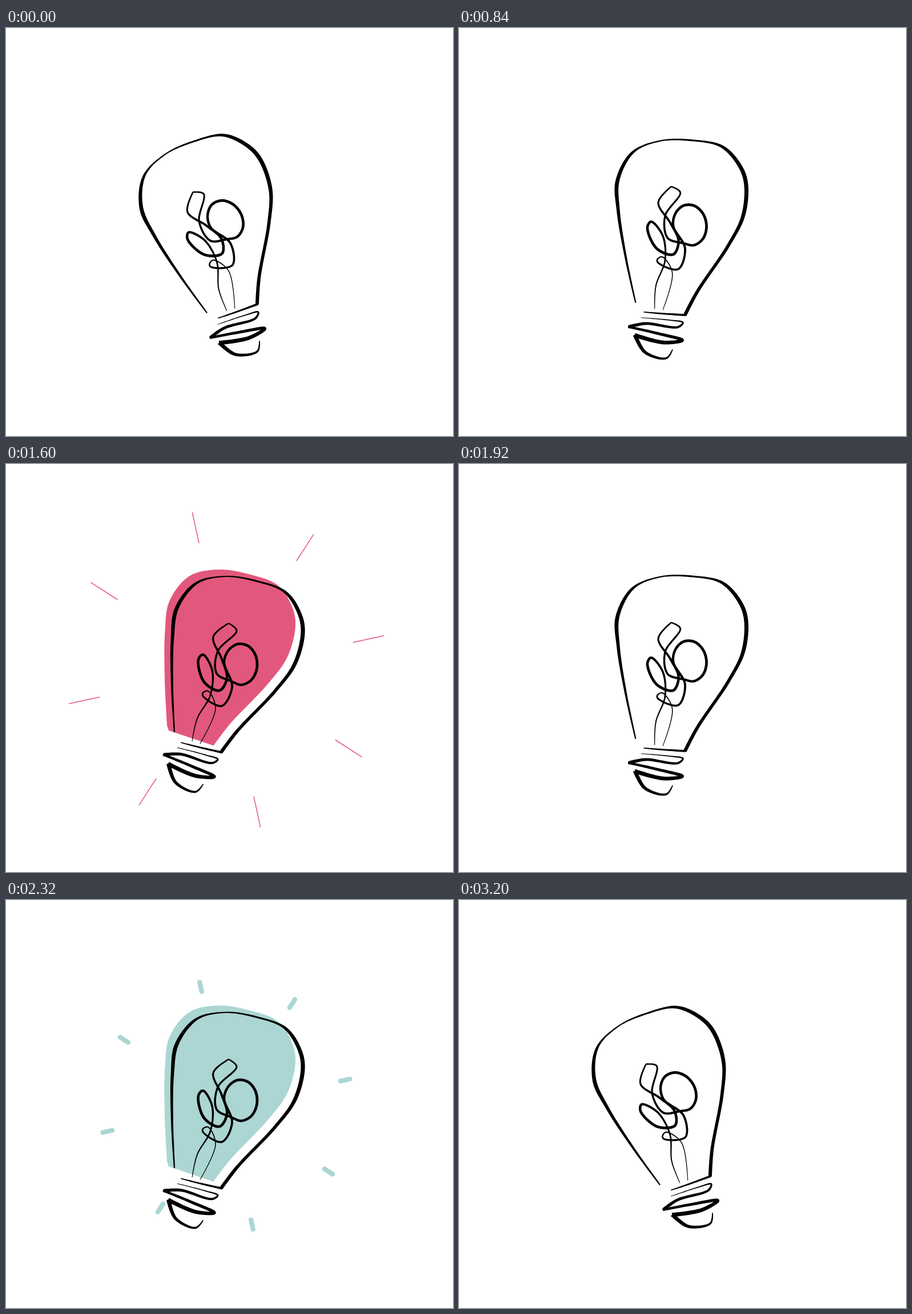
An HTML page for the animation above (3280 ms loop, 783 by 715 pixels).

```html
<!DOCTYPE html>
<html lang="en">
<head>
<meta charset="utf-8">
<title>Light bulb</title>
<style>
  html, body { margin: 0; width: 100%; height: 100%; overflow: hidden; background: #fff; }
  svg { display: block; width: 100%; height: 100%; }
</style>
</head>
<body>
<svg viewBox="0 0 783 715">
  <g id="bulb">
    <path id="glass"/>
    <path id="ink"/>
    <path id="rays" fill="none" stroke-linecap="round"/>
  </g>
</svg>
<script>
const LOOP = 3280, CYCLE = 1080, STEP = 40;
const PIVOT = [373.1, 388.5], TILT = -33.1;
const SWING_IN = 160, RAYS_END = 640, SWING_BACK = 760, SWING_DONE = 1040;

const lights = [
  { color: '#eff362', center: [398.2, 325.3], turn: -0.25 },
  { color: '#e2587d', center: [386, 360.5], turn: -12.2 },
  { color: '#abd6d3', center: [386, 360.5], turn: -12.2 }
];

const $ = id => document.getElementById(id);
const toPath = pts => 'M' + pts.map(p => p.map(v => v.toFixed(2)).join(' ')).join('L') + 'Z';
const distance = (p, q) => Math.hypot(q[0] - p[0], q[1] - p[1]);

function arc(cx, cy, rx, ry, from, to, count = 8) {
  return Array.from({ length: count + 1 }, (_, i) => {
    const a = (from + (to - from) * i / count) * Math.PI / 180;
    return [cx + rx * Math.cos(a), cy + ry * Math.sin(a)];
  });
}

// Centripetal Catmull-Rom curve through the points
function smooth(points, parts = 14) {
  const last = points.length - 1, out = [];
  const at = i => points[Math.max(0, Math.min(last, i))];
  const gap = (p, q) => Math.sqrt(distance(p, q)) || 1;
  for (let i = 0; i < last; i++) {
    const [a, b, c, d] = [at(i - 1), at(i), at(i + 1), at(i + 2)];
    const [ab, bc, cd] = [gap(a, b), gap(b, c), gap(c, d)];
    for (let k = 0; k < parts; k++) {
      const u = k / parts;
      out.push([0, 1].map(n => {
        const step = c[n] - b[n];
        const m = step + bc * ((b[n] - a[n]) / ab - (c[n] - a[n]) / (ab + bc));
        const o = step + bc * ((d[n] - c[n]) / cd - (d[n] - b[n]) / (bc + cd));
        return b[n] + u * (m + u * (3 * step - 2 * m - o + u * (m + o - 2 * step)));
      }));
    }
  }
  return [...out, at(last)];
}

// Ribbon along a curve; width depends on progress u and steepness
function brush([points, width]) {
  const line = smooth(points), last = line.length - 1, left = [], right = [];
  line.forEach(([x, y], i) => {
    const p = line[Math.max(0, i - 1)], q = line[Math.min(last, i + 1)];
    const length = distance(p, q) || 1;
    const dx = (q[0] - p[0]) / length, dy = (q[1] - p[1]) / length;
    const half = width(i / last, Math.abs(dy)) / 2;
    left.push([x - dy * half, y + dx * half]);
    right.unshift([x + dy * half, y - dx * half]);
  });
  return toPath([...left, ...right]);
}

const ramp = (from, to) => u => from + (to - from) * u;
const swell = u => 1 + 3.8 * Math.sin(Math.PI * (0.12 + 0.88 * u));
const nib = (u, steep) => (2.2 + 5 * steep ** 1.3) * Math.min(1, 0.28 + 3.3 * u);

const outline = [
  [295, 470], [291, 390], [291.5, 305], [299, 253], [334, 208.5], [385, 197], [440, 205.5],
  [489, 224.5], [514, 262], [520, 295], [506, 350], [472, 397], [405, 468], [376.5, 505.5]
];
const collar = [[378, 505.5], [333, 495], [306, 488]];
const thread = [[300, 497], [350, 510], [371, 517.5], [361, 524], [306, 508.5], [276, 509.5]];
const lowerThread = [[275, 509], [325, 529.5], [365, 548], [332, 546.5], [284, 525.5]];
const cap = [[284.5, 525], [297, 558], [332, 574.5], [345.5, 561]];
const rightWire = [
  [390, 279], [404, 292], [371, 328], [369, 367], ...arc(411, 351, 29, 36, 125, -175),
  [396, 390], [378, 424], [345, 406.5], [345, 401], [354, 398], [367, 428], [340, 490]
];
const leftWire = [
  [390, 279], [363, 303], [378, 342], [387, 375], [374, 397], [347, 382],
  [337, 343], [345, 334], [361, 361], [358, 405], [335, 446], [326, 486]
];

const strokes = [
  [outline, nib],
  [collar, ramp(4, 1.4)],
  [thread, ramp(0.8, 6)],
  [lowerThread, ramp(4, 7.5)],
  [cap, ramp(7.5, 1.4)],
  [rightWire, swell],
  [leftWire, swell]
];

function tilt(phase) {
  if (phase < SWING_IN) return TILT * (1 - phase / SWING_IN);
  if (phase < SWING_BACK) return 0;
  return TILT * Math.min(1, (phase - SWING_BACK) / (SWING_DONE - SWING_BACK));
}

function burst({ center: [cx, cy], turn }, age) {
  const inner = 194.5 + age * 0.0635, outer = 194.5 + age * 0.168;
  let d = '';
  for (let i = 0; i < 8; i++) {
    const a = (turn + i * 45) * Math.PI / 180, s = Math.sin(a), c = -Math.cos(a);
    d += `M${cx + s * inner} ${cy + c * inner}L${cx + s * outer} ${cy + c * outer}`;
  }
  return d;
}

function draw(time) {
  const t = Math.floor(time % LOOP / STEP) * STEP;
  const index = Math.min(lights.length - 1, Math.floor(t / CYCLE));
  const light = lights[index], phase = t - index * CYCLE;

  $('bulb').setAttribute('transform', `rotate(${tilt(phase)} ${PIVOT})`);
  $('glass').setAttribute('fill', phase > 0 && phase < SWING_BACK ? light.color : 'none');
  $('rays').setAttribute('d', phase > 0 && phase <= RAYS_END ? burst(light, phase) : '');
  $('rays').setAttribute('stroke', light.color);
  $('rays').setAttribute('stroke-width', Math.max(1.2, 11.2 * (1 - phase / 600)));
}

// The colour is the outline's own shape, printed off register
const shifted = smooth(outline).map(([x, y]) => [x - 13, y - 12]);
$('glass').setAttribute('d', toPath([[285, 467], ...shifted]));
$('ink').setAttribute('d', strokes.map(brush).join(''));

const start = performance.now();
function tick() {
  draw(performance.now() - start);
  requestAnimationFrame(tick);
}
tick();
</script>
</body>
</html>
```
